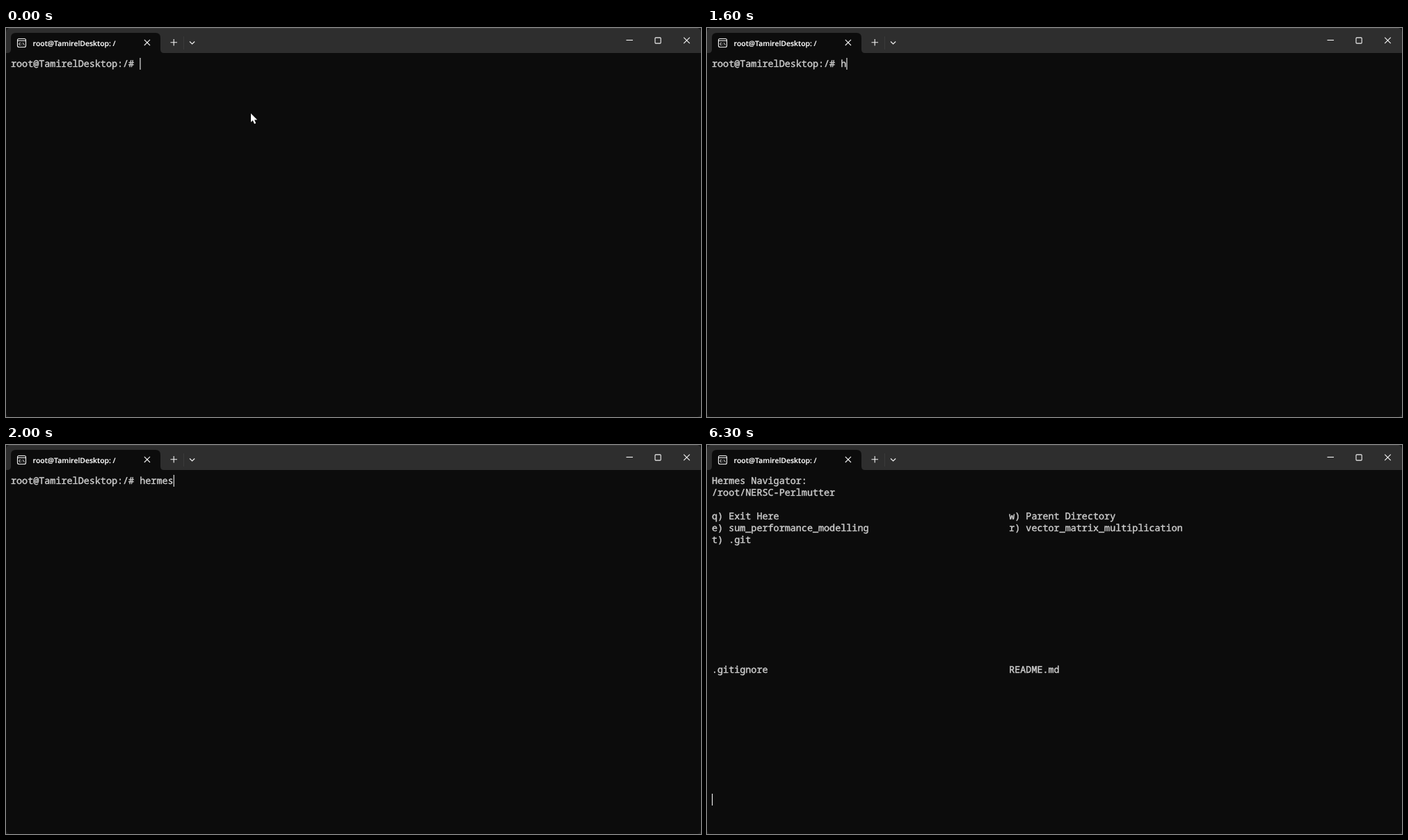
Write an HTML page that moves like this. It is 999 px wide and 560 px high and loops after 8000 ms.

```html
<!DOCTYPE html>
<html lang="en">
<head>
<meta charset="utf-8">
<title>Terminal</title>
<style>
  html, body { margin: 0; width: 100%; height: 100%; overflow: hidden; background: #1c1c1c; }
  svg { display: block; width: 999px; height: 560px; }
  text { text-rendering: geometricPrecision; white-space: pre; }
  #screen text {
    font: 500 13.43px "Noto Sans Mono", "DejaVu Sans Mono", monospace;
    fill: #ccc; stroke: #ccc; stroke-width: .45px;
  }
  .tab { font: 600 10.45px "Open Sans", "Noto Sans", sans-serif; fill: #fff; stroke: #fff; stroke-width: .15px; }
  .icon { fill: none; stroke: #f4f4f4; stroke-width: 1.1; }
</style>
</head>
<body>
<svg viewBox="0 0 999 560">
  <defs><clipPath id="window"><rect width="999" height="560" rx="6"/></clipPath></defs>
  <g clip-path="url(#window)">
    <rect width="999" height="560" fill="#0c0c0c"/>
    <rect width="999" height="36" fill="#2e2e2e"/>
    <rect width="999" height="1" fill="#3b3b3b"/>
    <path d="M2 36Q7 36 7 31V14Q7 7 14 7H215Q222 7 222 14V31Q222 36 227 36Z" fill="#0c0c0c"/>
  </g>
  <path d="M255.5 12V31" stroke="#3b3b3b"/>
  <g class="icon">
    <rect x="16.5" y="15.5" width="12" height="12" rx="2"/>
    <path d="M16.5 18.3H28.5"/>
    <path d="M21.2 21.6Q18.7 20.8 18.7 23T21.2 24.4M23 21.5V22.4M23 23.9V24.8M24.6 21.2L26.4 25" stroke-width=".9"/>
    <path d="M198.8 16.8L207 25M207 16.8L198.8 25"/>
    <path d="M236.5 20.8H246M241.2 16V25.5"/>
    <path d="M264 19.5L267.6 23L271.2 19.5"/>
    <path d="M891.5 17.5H901"/>
    <rect x="933" y="13.9" width="8.2" height="8.2" rx="1"/>
    <path d="M974.2 13.6L982.8 22.2M982.8 13.6L974.2 22.2"/>
  </g>
  <text class="tab" x="38.6" y="25.5">root@TamirelDesktop: /</text>
  <g id="screen"></g>
  <rect id="caret" width="1.1" height="17" fill="#f2f2f2"/>
  <path id="pointer" d="M0 0V12.6L2.8 10L5 15L7.2 14L5.1 9.2H9.2Z" fill="#fff"/>
</svg>
<script>
const LOOP = 8000, LEFT = 7, CELL = 8.06, ROW = 17, BASE = 56;
const PROMPT = "root@TamirelDesktop:/# ";
const $ = id => document.getElementById(id);
const screen = $("screen"), caret = $("caret"), pointer = $("pointer");

const shell = typed => ({
  lines: [[PROMPT + typed, 0, 0]],
  caret: [PROMPT.length + typed.length, 0]
});

// Items fill two columns, row by row.
const columns = (items, row) =>
  items.map((item, i) => [item, i % 2 * 53, row + (i >> 1)]);

function listing(path, folders, files) {
  const keys = "qwertyuiopasdfghjklzxcvbnm";
  const entries = ["Exit Here", "Parent Directory", ...folders.split(" ")];
  return {
    lines: [
      ["Hermes Navigator:", 0, 0],
      [path, 0, 1],
      ...columns(entries.map((name, i) => `${keys[i]}) ${name}`), 3),
      ...columns(files.split(" "), 16)
    ],
    caret: [0, 27]
  };
}

const screens = [
  [0, shell("")],
  [1600, shell("h")],
  [1700, shell("her")],
  [1900, shell("herme")],
  [2000, shell("hermes")],
  [2100, listing("/",
    "home dev sbin.usr-is-merged lost+found proc bin.usr-is-merged usr var etc mnt " +
    "sys boot snap srv root tmp media opt lib.usr-is-merged run", "init")],
  [4900, listing("/root", "NERSC-Perlmutter .ssh .local Hermes .cache",
    ".motd_shown .bash_history .profile .bashrc .gitconfig")],
  [6300, listing("/root/NERSC-Perlmutter",
    "sum_performance_modelling vector_matrix_multiplication .git", ".gitignore README.md")]
];

const pointerSteps = [
  [0, [352, 123]],
  [100, [448, 120]],
  [200, [690, 146]],
  [300, [809, 181]],
  [600, [813, 181]],
  [700, null]
];

const at = (steps, time) => steps.findLast(([start]) => start <= time)[1];

function show({ lines, caret: [col, row] }) {
  screen.replaceChildren(...lines.map(([content, x, y]) => {
    const text = document.createElementNS("http://www.w3.org/2000/svg", "text");
    text.setAttribute("x", LEFT + x * CELL);
    text.setAttribute("y", BASE + y * ROW);
    text.textContent = content;
    return text;
  }));
  caret.setAttribute("x", LEFT + col * CELL);
  caret.setAttribute("y", BASE - 13 + row * ROW);
}

let current, begin;
function draw(now) {
  begin ??= now;
  const time = (now - begin) % LOOP;
  const next = at(screens, time);
  if (next !== current) show(current = next);
  const spot = at(pointerSteps, time);
  pointer.style.display = spot ? "" : "none";
  if (spot) pointer.setAttribute("transform", `translate(${spot})`);
  requestAnimationFrame(draw);
}
requestAnimationFrame(draw);
</script>
</body>
</html>
```
